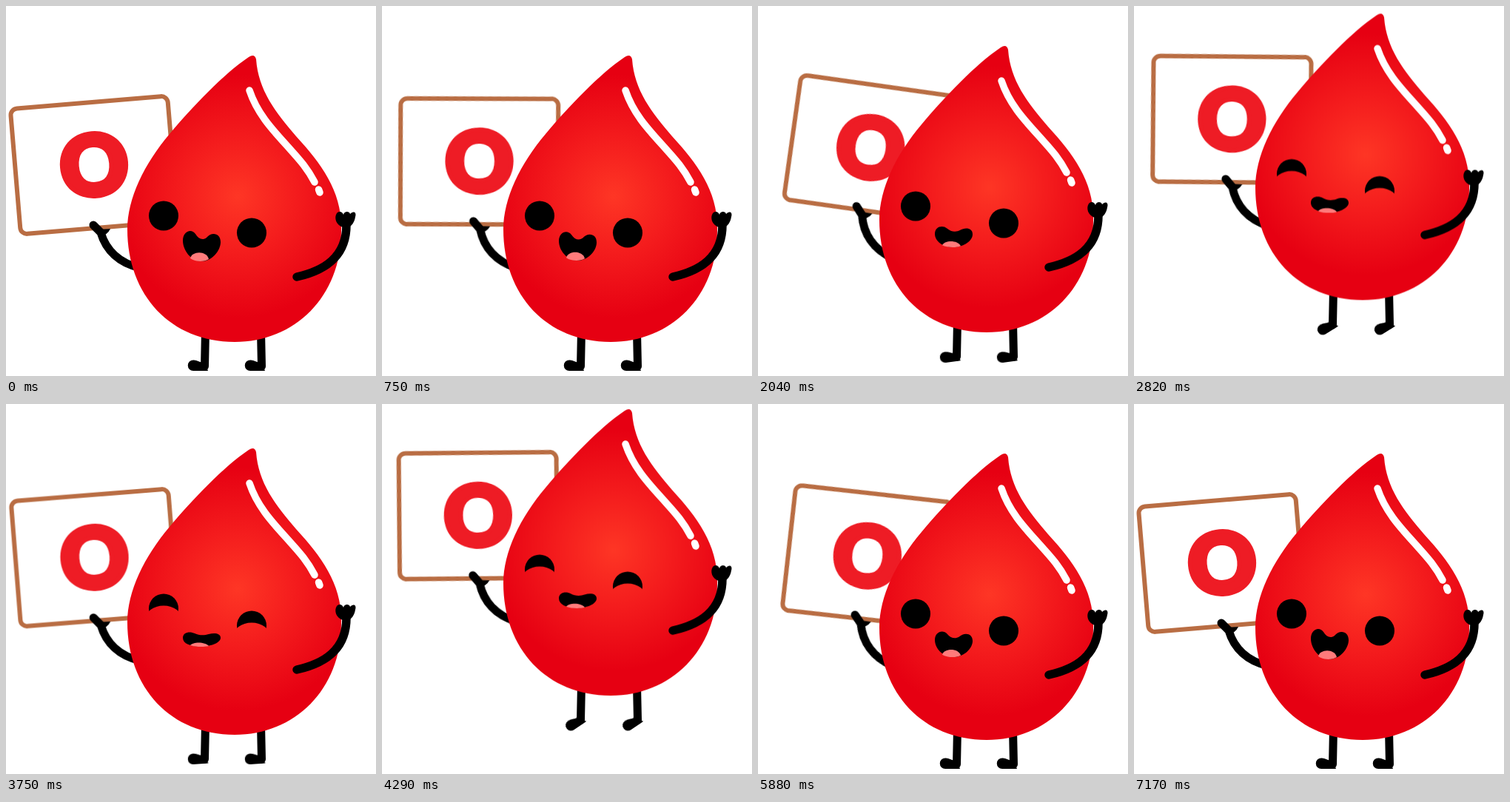
Write an HTML page without scripts that moves like this. It is 500 by 500 pixels and loops after 7200 ms.

```html
<!DOCTYPE html>
<html lang="en">
<head>
<meta charset="utf-8">
<title>Blood drop</title>
<style>
  html, body { margin: 0; width: 100%; height: 100%; overflow: hidden; background: #fff; }
  svg { display: block; width: 100%; height: 100%; }

  .ink { fill: none; stroke: #000; stroke-width: 11; stroke-linecap: round; stroke-linejoin: round; }
  .shine { fill: none; stroke: #fff; stroke-width: 9.5; stroke-linecap: round; }
  .letter { font: 900 114px Lato, sans-serif; fill: #ee1c25; stroke: #ee1c25; stroke-width: 6; text-anchor: middle; }

  .hop, .foot, .lid { animation: 7.2s cubic-bezier(.37, 0, .63, 1) infinite; }
  .hop { animation-name: hop; }
  .foot { animation-name: tilt; transform-origin: 268px 486px; }
  .lid { animation-name: lid; }
  .wave, .mouth, .tongue { animation: 1.8s cubic-bezier(.37, 0, .63, 1) infinite alternate; }
  .wave { animation-name: wave; transform-origin: 181px 357px; }
  .mouth, .tongue { animation-duration: 3.6s; }
  .mouth { animation-name: mouth; }
  .tongue { animation-name: tongue; }

  @keyframes hop {
    0%, 12.5%, 31.25%, 50%, 68.75%, 100% { transform: translateY(0); }
    21.875%, 40.625%, 59.375% { transform: translateY(-60px); }
  }
  @keyframes tilt {
    0%, 12.5%, 31.25%, 50%, 68.75%, 100% { transform: rotate(0deg); }
    21.875%, 40.625%, 59.375% { transform: rotate(-34deg); }
  }
  @keyframes wave {
    from { transform: rotate(0deg); }
    to { transform: rotate(13.4deg); }
  }
  /* the cheek cuts the eyes into arches while they are shut */
  @keyframes lid {
    0%, 30.5%, 69.5%, 100% { transform: translateY(25px); }
    37.5%, 62.5% { transform: translateY(0); }
  }
  @keyframes mouth {
    from { d: path("M239 317C239 305 250 300 256 308C260 315 266 317 271 313C277 305 290 306 290 319C290 331 278 345 264 345C250 345 239 330 239 317Z"); }
    to { d: path("M239 323C239 315 249 314 255 317C261 320 268 320 274 318C282 316 290 317 290 323C290 329 279 334.5 264 334.5C249 334.5 239 331 239 323Z"); }
  }
  @keyframes tongue {
    from { d: path("M249 341C251 331 271 330 274 342C268 346 256 346 249 341Z"); }
    to { d: path("M249 333C253 328 269 328 274 334C268 335.5 256 335.5 249 333Z"); }
  }
</style>
</head>
<body>
<svg viewBox="0 0 500 500">
  <defs>
    <radialGradient id="red" gradientUnits="userSpaceOnUse" cx="313" cy="257" r="165">
      <stop offset="0" stop-color="#fe3625"/>
      <stop offset=".47" stop-color="#f41c1d"/>
      <stop offset="1" stop-color="#e60012"/>
    </radialGradient>
    <mask id="lids" maskUnits="userSpaceOnUse" x="180" y="250" width="190" height="90">
      <rect x="180" y="250" width="190" height="90" fill="#fff"/>
      <ellipse class="lid" cx="213" cy="298.500" rx="25" ry="19"/>
      <ellipse class="lid" cx="332" cy="321.500" rx="25" ry="19"/>
    </mask>
  </defs>

  <g class="hop">
    <g class="wave">
      <g transform="rotate(-4.8 119 215)">
        <rect x="12.500" y="130" width="213" height="170" rx="9" fill="#fff" stroke="#b96d43" stroke-width="6"/>
        <text class="letter" x="119" y="256">O</text>
      </g>
      <path class="ink" d="M182 354C153 348 135 330 128 306L118 296"/>
      <path d="M119 302Q129 302 141 301Q137 310 127 311Z"/>
    </g>

    <g>
      <path class="ink" d="M269.500 440L268.500 487"/>
      <path class="foot" d="M273 493H253A7 7 0 0 1 253 478.500C259 478 262 483 268 481Z"/>
    </g>
    <g transform="translate(77 0)">
      <path class="ink" d="M267.500 440L268.500 487"/>
      <path class="foot" d="M273 493H253A7 7 0 0 1 253 478.500C259 478 262 483 268 481Z"/>
    </g>

    <path fill="url(#red)" d="M328 69Q336 64 338 72C341 114 364 143 392 176C427 214 455 252 453 304C453 393 390 454 309 454C223 454 164 391 164 302C164 260 187 213 221 173C252 136 295 91 328 69Z"/>
    <path class="shine" d="M329 114C339 144 358 165 379 188C395 206 406 217 417 238M422.500 248L424 252"/>

    <path class="ink" style="stroke-width:11.500" d="M393 366C429 358 460 340 460 296"/>
    <path d="M455 299C446 296 443 286 447 280C451 276 455 279 456 282C457 277 464 277 465 281C470 276 474 279 472 285C471 292 467 298 461 300Z"/>

    <g mask="url(#lids)">
      <circle cx="213" cy="283.500" r="20"/>
      <circle cx="332" cy="306.500" r="20"/>
    </g>
    <path class="mouth" d="M239 317C239 305 250 300 256 308C260 315 266 317 271 313C277 305 290 306 290 319C290 331 278 345 264 345C250 345 239 330 239 317Z"/>
    <path class="tongue" fill="#ff7b7b" d="M249 341C251 331 271 330 274 342C268 346 256 346 249 341Z"/>
  </g>
</svg>
</body>
</html>
```
